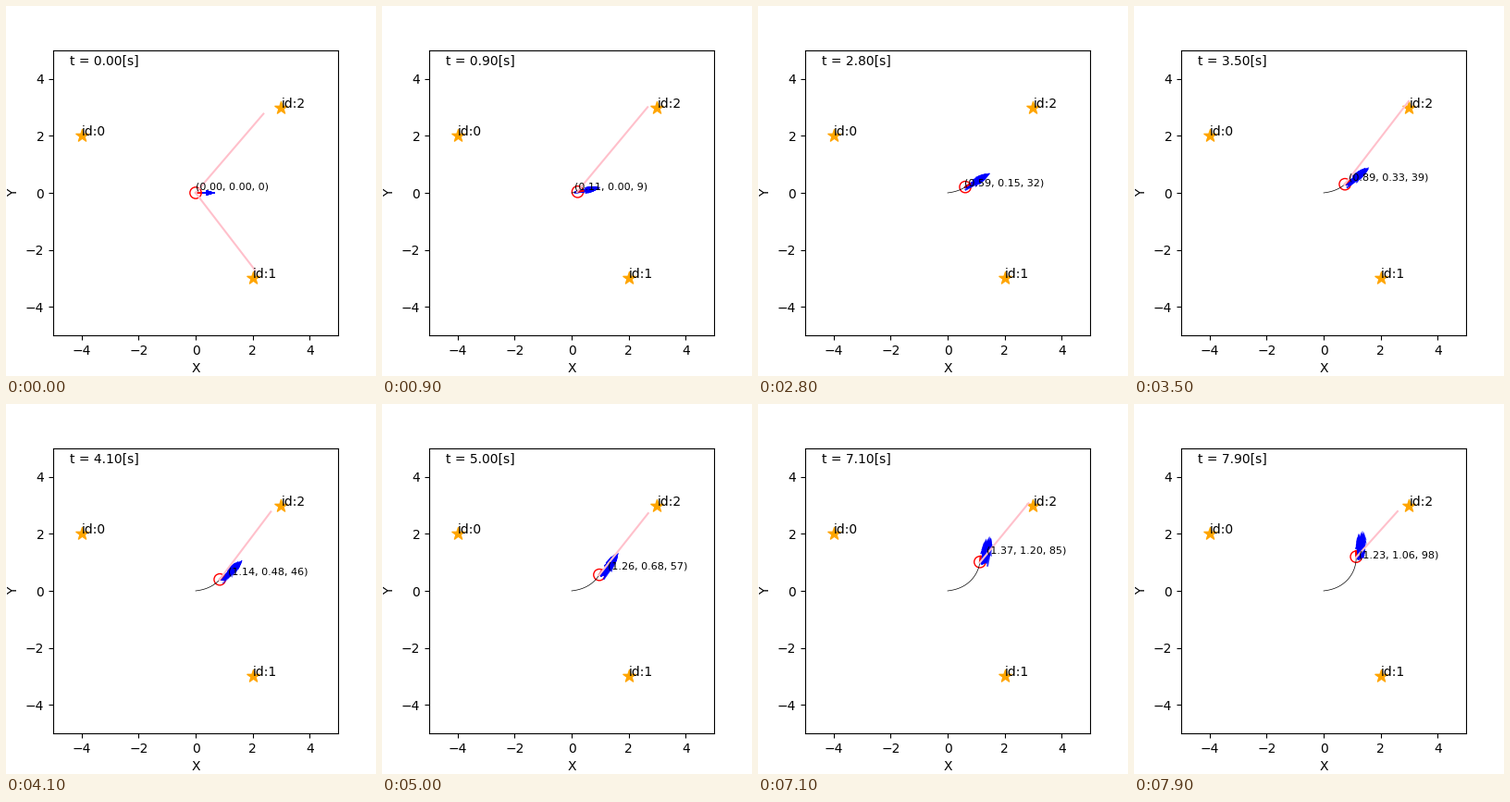
Recreate the animation shown at these times as a matplotlib script. Size 400 by 400 pixels, loop 8 s.

```python
import math

import matplotlib.pyplot as plt
import numpy as np
from matplotlib.animation import FuncAnimation
from matplotlib.patches import Circle

FRAMES, DT, N = 80, 0.1, 100
OMEGA, TURN_R, ROBOT_R = 0.203, 1.13, 0.2
LANDMARKS = [(-4, 2), (2, -3), (3, 3)]

# Waypoints of the estimate: time, x, y, degrees
WAYPOINTS = np.array([(0, 0, 0, 0), (1.9, 0.23, 0.01, 20), (2.8, 0.59, 0.15, 32),
                      (4.1, 1.14, 0.48, 46), (5.9, 1.377, 0.87, 68),
                      (7.1, 1.37, 1.20, 85), (7.9, 1.23, 1.06, 98)])

pool = np.random.default_rng(4).normal(size=(40, 3)).clip(-1.9, 1.9)


def pose(t):
    """Position and heading on a circular arc with a small sideways slip."""
    a = OMEGA * t
    slip = 1 - np.exp(-t)
    return (TURN_R * np.sin(a) + 0.012 * slip,
            TURN_R * (1 - np.cos(a)) + 0.03 * slip, a)


def particles(t, rng):
    """Resampled cloud that spreads out and drifts ahead of the robot."""
    x, y, a = pose(t)
    along, across, turn = pool[rng.integers(0, len(pool), N)].T
    grow = math.sqrt(min(1, t / 1.9))
    along = 0.11 * grow * along
    across = 0.008 * t * across
    drift = 1 - math.exp(-(t / 2.7) ** 4)
    return (x + 0.18 * drift + along * math.cos(a) - across * math.sin(a),
            y + 0.04 * drift + along * math.sin(a) + across * math.cos(a),
            a + 0.06 * grow * turn)


def estimate(t):
    x, y, deg = (np.interp(t, WAYPOINTS[:, 0], col) for col in WAYPOINTS.T[1:])
    return x, y, int(deg + 1e-6)


def sense(t, rng):
    """Noisy, biased landmark readings; none arrive during a short dropout."""
    if 1.5 < t < 3.2:
        return
    x, y, a = pose(t)
    for lx, ly in LANDMARKS:
        bearing = math.atan2(ly - y, lx - x)
        dist = math.hypot(lx - x, ly - y) * rng.normal(0.91, 0.05)
        seen = bearing + math.radians(rng.normal(3.3, 1))
        if abs(bearing - a) < math.pi / 3:
            yield x + dist * math.cos(seen), y + dist * math.sin(seen)


fig = plt.figure(figsize=(4, 4), dpi=100)
ax = fig.add_subplot(111)
ax.set_aspect("equal")
ax.set(xlim=(-5, 5), ylim=(-5, 5))
ax.set_xlabel("X", fontsize=10)
ax.set_ylabel("Y", fontsize=10)
for k, (lx, ly) in enumerate(LANDMARKS):
    ax.scatter(lx, ly, s=100, marker="*", color="orange")
    ax.text(lx, ly, f"id:{k}", fontsize=10)

moving = []


def draw(i):
    while moving:
        moving.pop().remove()
    t = i * DT
    rng = np.random.default_rng(100 + i)
    x, y, a = pose(t)
    moving.append(ax.text(-4.4, 4.5, f"t = {t:.2f}[s]", fontsize=10))

    moving.extend(ax.plot([x, x + ROBOT_R * math.cos(a)],
                          [y, y + ROBOT_R * math.sin(a)], color="red"))
    moving.append(ax.add_patch(Circle((x, y), ROBOT_R, fill=False, color="red")))
    px, py, _ = pose(np.arange(i + 1) * DT)
    moving.extend(ax.plot(px, py, linewidth=0.5, color="black"))

    x0, y0, _ = pose(max(t - DT, 0))
    for sx, sy in sense(t, rng):
        moving.extend(ax.plot([x0, sx], [y0, sy], color="pink"))

    qx, qy, qa = particles(t, rng)
    moving.append(ax.quiver(qx, qy, np.cos(qa), np.sin(qa), angles="xy",
                            scale_units="xy", scale=1.5, color="blue", alpha=0.5))
    ex, ey, deg = estimate(t)
    moving.append(ax.text(ex, ey + 0.1, f"({ex:.2f}, {ey:.2f}, {deg})", fontsize=8))
    return moving


anim = FuncAnimation(fig, draw, frames=FRAMES, interval=100, repeat=True,
                     repeat_delay=0, init_func=lambda: draw(0))
plt.show()
```
